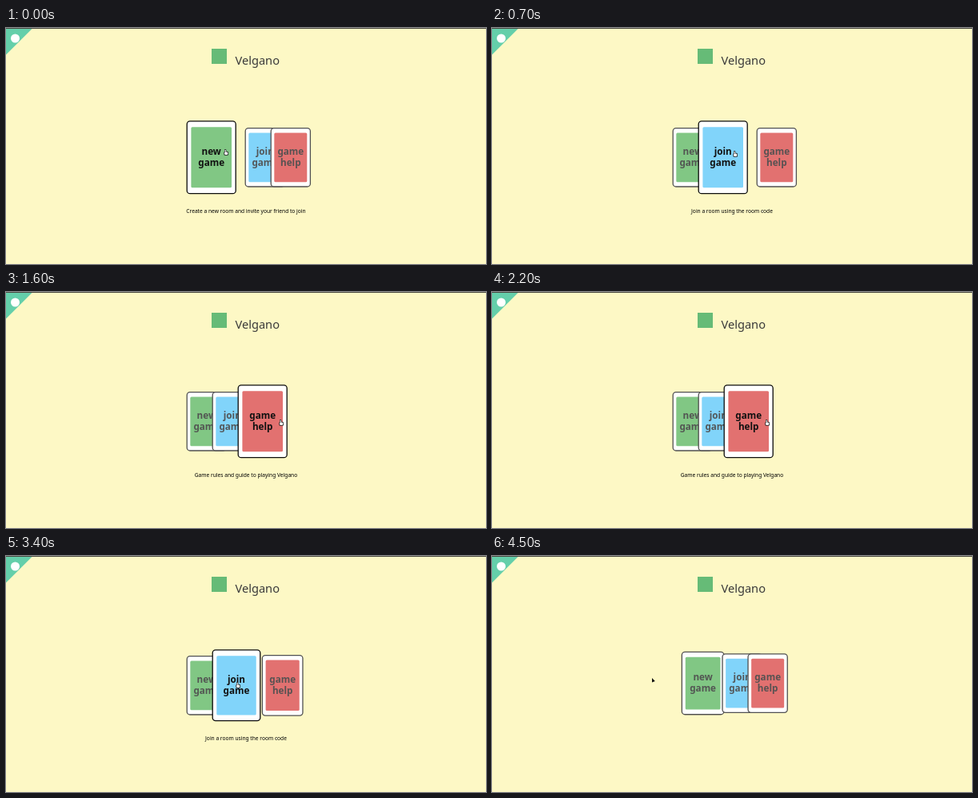
These frames come from a looping animation (600x296 px, 4.6 s). An HTML page with a canvas:

```html
<!DOCTYPE html>
<html lang="en">
<head>
<meta charset="utf-8">
<title>Velgano</title>
<style>
  html, body { margin: 0; width: 100%; height: 100%; overflow: hidden; background: #fdf8c5; }
  canvas { display: block; width: 600px; height: 296px; }
</style>
</head>
<body>
<canvas id="stage"></canvas>
<script>
const W = 600, H = 296, LOOP = 4600, STEP = 100;
const FONT = '"Noto Sans", "Open Sans", sans-serif';
const canvas = document.getElementById('stage');
const ctx = canvas.getContext('2d');
const dpr = window.devicePixelRatio || 1;
canvas.width = W * dpr;
canvas.height = H * dpr;

const cards = [
  { words: ['new', 'game'], color: '#81c784', hint: 'Create a new room and invite your friend to join' },
  { words: ['join', 'game'], color: '#81d4fa', hint: 'Join a room using the room code' },
  { words: ['game', 'help'], color: '#e27170', hint: 'Game rules and guide to playing Velgano' }
];

// When the pointer is over which card
const hovers = [
  { card: 0, from: -LOOP, to: 120 },
  { card: 1, from: 190, to: 855 },
  { card: 2, from: 958, to: 3180 },
  { card: 1, from: 3180, to: 3907 },
  { card: 0, from: 3907, to: 4342 }
];

// The pointer's resting places, and when it arrives and leaves
const rests = [
  { x: 275, y: 156, arrive: 0, leave: 0 },
  { x: 304, y: 158, arrive: 450, leave: 700 },
  { x: 344, y: 164, arrive: 1150, leave: 2800 },
  { x: 290, y: 162, arrive: 3200, leave: 3500 },
  { x: 200, y: 156, arrive: 4500, leave: LOOP }
];

const mix = (a, b, p) => a + (b - a) * p;

// cubic-bezier(.25, .1, .25, 1), solved by bisection
function ease(x) {
  if (x <= 0) return 0;
  if (x >= 1) return 1;
  const curve = (a, b, u) => 3 * a * u * (1 - u) ** 2 + 3 * b * u * u * (1 - u) + u ** 3;
  let lo = 0, hi = 1;
  for (let i = 0; i < 24; i++) {
    const mid = (lo + hi) / 2;
    if (curve(0.25, 0.25, mid) < x) lo = mid; else hi = mid;
  }
  return curve(0.1, 1, lo);
}

function cardState(index, t) {
  const last = hovers.filter(h => h.card === index && h.from <= t).pop();
  const on = !!last && t < last.to;
  const progress = ms => {
    if (!last) return 0;
    return on ? ease((t - last.from) / ms) : 1 - ease((t - last.to) / ms);
  };
  const size = progress(370);
  return {
    on,
    w: mix(50.4, 62.2, size),
    h: mix(74.6, 92, size),
    padX: mix(4.7, 5.8, size),
    padY: mix(6.4, 8, size),
    slot: mix(32, 73, progress(500))
  };
}

function box(x, y, w, h, r, fill) {
  ctx.beginPath();
  ctx.roundRect(x, y, w, h, r);
  ctx.fillStyle = fill;
  ctx.fill();
}

function triangle(x, y, dx, dy, fill) {
  ctx.beginPath();
  ctx.moveTo(x, y);
  ctx.lineTo(x + dx, y + dy);
  ctx.lineTo(x, y + Math.hypot(dx, dy));
  ctx.closePath();
  ctx.fillStyle = fill;
  ctx.fill();
}

function label(str, x, y, size, color, weight = 400, align = 'center') {
  ctx.font = `${weight} ${size}px ${FONT}`;
  ctx.textAlign = align;
  ctx.fillStyle = color;
  ctx.fillText(str, x, y);
}

function drawCard(card, s, x, cy) {
  const top = cy - s.h / 2;
  box(x + 0.6, top + 0.6, s.w - 1.2, s.h - 1.2, 3.8, '#fff');
  ctx.strokeStyle = s.on ? '#0c0c0c' : '#505050';
  ctx.lineWidth = 1.3;
  ctx.stroke();
  box(x + s.padX, top + s.padY, s.w - 2 * s.padX, s.h - 2 * s.padY, 1.5, card.color);
  const ink = s.on ? '#111' : 'rgba(80,80,80,.95)';
  card.words.forEach((word, i) =>
    label(word, x + s.w / 2, cy - 3.4 + i * 14.2, 11.7, ink, 600));
}

function drawHeader() {
  ctx.fillStyle = '#fdf8c5';
  ctx.fillRect(0, 0, W, H);
  triangle(0, 0, 33.5, 0, '#64cfaa');
  box(6, 7.5, 11, 11, 5.5, '#fff');
  ctx.fillStyle = '#4a4942';
  ctx.fillRect(0, 0, W, 1);
  box(257, 26, 19, 19, 0, '#66bb77');
  label('Velgano', 286.5, 46, 14.6, '#3a3a3a', 400, 'left');
}

function drawPointer(t, hovering) {
  const next = rests.findIndex(r => t < r.leave);
  const b = rests[next], a = rests[next - 1] || b;
  const p = Math.min(1, (t - a.leave) / (b.arrive - a.leave || 1));
  const x = mix(a.x, b.x, p), y = mix(a.y, b.y, p);
  if (!hovering) {
    triangle(x, y - 3, 3.8, 3.9, '#111');
    return;
  }
  // Dark shapes first, then white ones inset, so the hand gets an outline.
  for (const [inset, fill] of [[0, '#222'], [0.7, '#fff']]) {
    const side = 2 * inset;
    box(x - 2.6 + inset, y - 1.2 + inset, 5.6 - side, 5 - side, 1.5, fill);
    box(x - 2 + inset, y - 4 + inset, 2.4 - side, 5 - side, 1, fill);
  }
}

function draw(t) {
  ctx.setTransform(dpr, 0, 0, dpr, 0, 0);
  drawHeader();
  const states = cards.map((_, i) => cardState(i, t));
  const active = states.findIndex(s => s.on);
  const total = states.reduce((sum, s) => sum + s.slot, 0);
  const tallest = Math.max(...states.map(s => s.h));
  const cy = active < 0 ? 159.6 : 162.3;
  let x = 294.1 - total / 2;
  cards.forEach((card, i) => {
    drawCard(card, states[i], x, cy);
    x += states[i].slot;
  });
  if (active >= 0) label(cards[active].hint, 300, 231.6 + (tallest - 92) / 2, 6.65, '#000', 500);
  drawPointer(t, active >= 0);
}

// The picture advances ten times a second.
const begin = performance.now();
function tick() {
  const t = (performance.now() - begin) % LOOP;
  draw(Math.floor(t / STEP) * STEP);
  requestAnimationFrame(tick);
}
tick();
</script>
</body>
</html>
```
